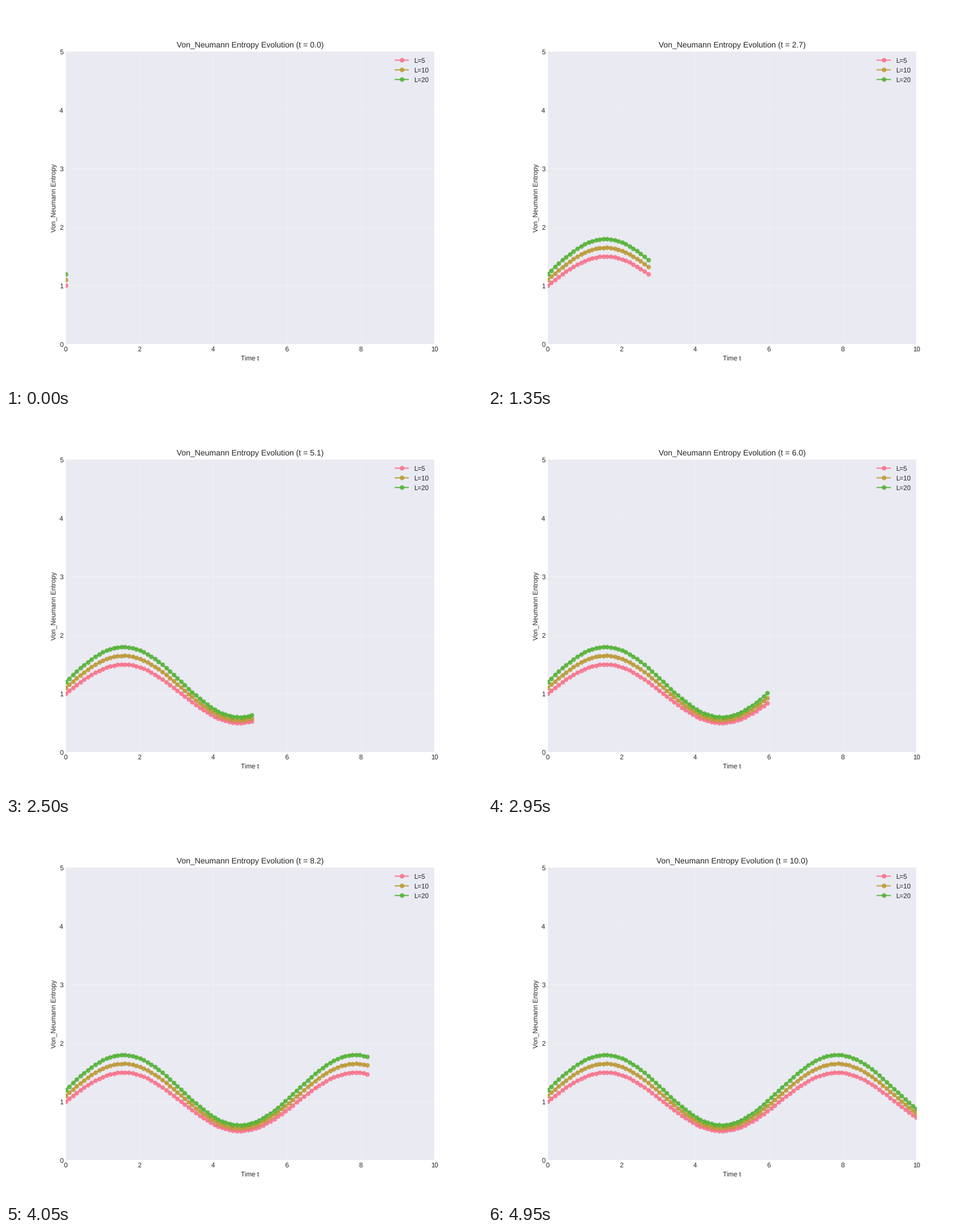
Animation, 837 px wide and 669 px high, one loop 5 s. Source, as a matplotlib script:

```python
import numpy as np
import matplotlib.pyplot as plt
from matplotlib.animation import FuncAnimation

WIDTH, HEIGHT, DPI = 837, 669, 83.66
FRAMES, INTERVAL = 100, 50
INK = "0.15"
QUANTITY = "Von_Neumann Entropy"
SERIES = [(5, 1.0, "#f77189"), (10, 1.1, "#bb9832"), (20, 1.2, "#50b131")]

plt.rcParams.update({
    "font.family": "Liberation Sans",
    "text.color": INK,
    "text.hinting": "no_hinting",
    "axes.labelcolor": INK,
    "axes.facecolor": "#eaeaf2",
    "axes.edgecolor": "white",
    "axes.linewidth": 0,
    "axes.axisbelow": True,
    "grid.color": "white",
    "xtick.color": INK,
    "ytick.color": INK,
    "xtick.major.size": 0,
    "ytick.major.size": 0,
    "lines.solid_capstyle": "round",
    "legend.frameon": False,
})

# The small margin keeps the pixel size from rounding down.
fig, ax = plt.subplots(
    figsize=((WIDTH + 0.01) / DPI, (HEIGHT + 0.01) / DPI), dpi=DPI)
ax.set(xlim=(0, 10), ylim=(0, 5), xlabel="Time t")
ax.set_ylabel(QUANTITY, labelpad=3.4)
ax.grid(True, alpha=0.3)
title = ax.set_title("")

times = np.linspace(0, 10, FRAMES)
curves = [scale * (1 + 0.5 * np.sin(times)) for _, scale, _ in SERIES]
lines = [
    ax.plot([], [], "o-", color=color, lw=2, ms=6, alpha=0.8,
            label=f"L={size}")[0]
    for size, _, color in SERIES
]
legend = ax.legend(loc="upper right")
plt.setp(legend.get_lines(), snap=False)


def update(frame):
    end = frame + 1
    for line, curve in zip(lines, curves):
        line.set_data(times[:end], curve[:end])
    title.set_text(f"{QUANTITY} Evolution (t = {times[frame]:.1f})")
    return [*lines, title]


anim = FuncAnimation(fig, update, frames=FRAMES, interval=INTERVAL,
                     repeat=True, repeat_delay=0, blit=False)
plt.show()
```
